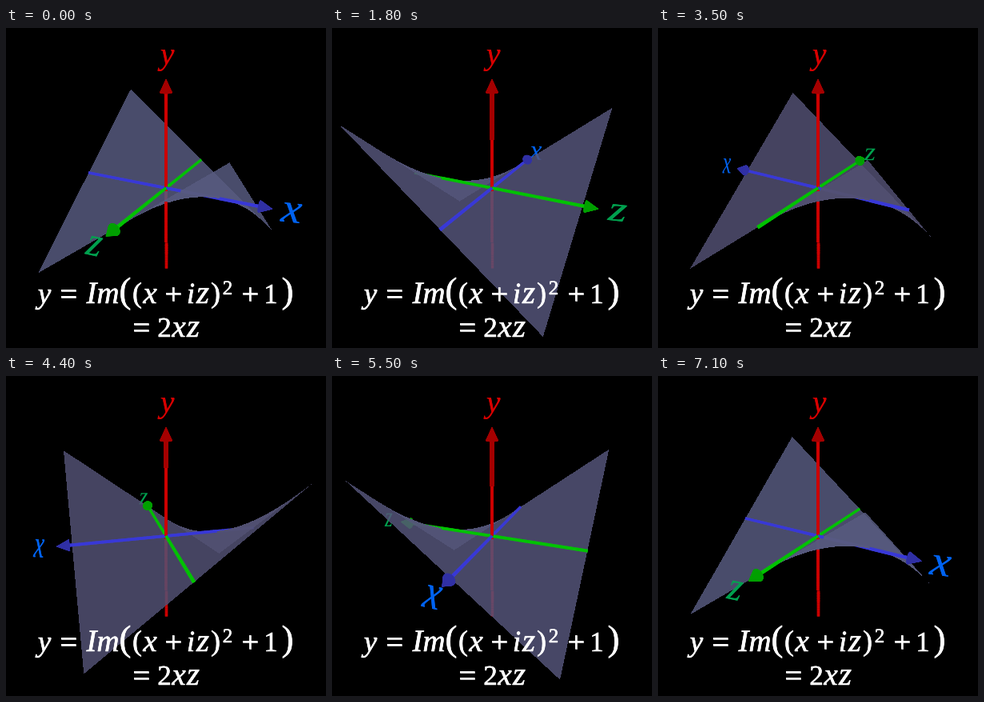
A matplotlib script for the animation above (7.2 s loop, 400 px wide and 400 px high).

```python
import numpy as np
import matplotlib.pyplot as plt
from matplotlib.animation import FuncAnimation
from matplotlib.collections import LineCollection, PolyCollection
from matplotlib.patches import PathPatch
from matplotlib.path import Path
from matplotlib.patheffects import withStroke
from matplotlib.textpath import TextPath

SIZE, FRAMES, STEP_MS = 400, 72, 100
PX = 72 / 100                       # points per pixel

# Camera
DIST, FOCAL = 4.3, 508
SIN_E, COS_E = 0.398, 0.9174
START = 26.4                        # degrees

# Saddle y = K x z over [LOW, HIGH] squared
K, LOW, HIGH, ALPHA = 0.8, -1.0, 0.972, 0.84

HEAD_BASE, HEAD_TIP, HEAD_RADIUS = 1.0, 1.12, 0.058
LABEL_AT = 1.295

# em and wide set the size and breadth of each axis letter
AXES = {
    "x": dict(dir=np.array([1.0, 0, 0]), shaft=(56, 56, 215),
              head=(48, 48, 165), text=(0, 98, 240), em=196, wide=0.97),
    "y": dict(dir=np.array([0, 1.0, 0]), shaft=(205, 0, 0),
              head=(165, 0, 0), text=(215, 0, 0), em=150, wide=1.0),
    "z": dict(dir=np.array([0, 0, 1.0]), shaft=(0, 195, 0),
              head=(0, 160, 0), text=(0, 160, 78), em=168, wide=1.17),
}


def rgb(color):
    return tuple(c / 255 for c in color)


def project(pts, a):
    """Screen x, screen y and depth of points (x, y, z)."""
    x, y, z = np.moveaxis(np.asarray(pts, float), -1, 0)
    r = x * np.cos(a) - z * np.sin(a)
    d = x * np.sin(a) + z * np.cos(a)
    depth = DIST - d * COS_E - y * SIN_E
    return (200 + FOCAL * r / depth,
            200 + FOCAL * (d * SIN_E - y * COS_E) / depth, depth)


def hits(px, py, a):
    """Both depths at which pixel rays meet the saddle (inf for a miss)."""
    p, q = (px - 200) / FOCAL, (200 - py) / FOCAL
    ca, sa = np.cos(a), np.sin(a)
    vd = -COS_E - q * SIN_E
    vy = -SIN_E + q * COS_E
    vx, vz = p * ca + vd * sa, -p * sa + vd * ca
    ox, oy, oz = DIST * COS_E * sa, DIST * SIN_E, DIST * COS_E * ca
    A = K * vx * vz
    B = K * (ox * vz + oz * vx) - vy
    C = K * ox * oz - oy
    found = []
    with np.errstate(all="ignore"):
        root = np.sqrt(B * B - 4 * A * C)
        m = -0.5 * (B + np.where(B < 0, -root, root))
        for s in (m / A, C / m):
            x, z = ox + s * vx, oz + s * vz
            ok = ((s > 0) & (x >= LOW) & (x <= HIGH)
                  & (z >= LOW) & (z <= HIGH))
            found.append(np.where(ok, s, np.inf))
    return found


def hidden(pts, a, bias=0.06):
    px, py, depth = project(pts, a)
    s1, s2 = hits(px, py, a)
    return np.minimum(s1, s2) < depth - bias


def surface(a):
    s1, s2 = hits(PIX_X, PIX_Y, a)
    count = np.isfinite(s1).astype(int) + np.isfinite(s2)
    blend = 0.5 + 0.5 * np.cos(a - 0.4)
    tint = (1 - blend) * np.array([70, 68, 97]) + blend * np.array([74, 77, 109])
    img = np.empty((SIZE, SIZE, 4))
    img[..., :3] = tint / 255 / ALPHA
    img[..., 3] = 1 - (1 - ALPHA) ** count
    return img


def cone(axis, a):
    """Base disc and side triangles of an arrowhead, on screen."""
    u, v = np.roll(axis, 1), np.roll(axis, 2)
    t = np.linspace(0, 2 * np.pi, 19)[:, None]
    ring = axis * HEAD_BASE + HEAD_RADIUS * (np.cos(t) * u + np.sin(t) * v)
    base = np.column_stack(project(ring, a)[:2])
    tip = np.array(project(axis * HEAD_TIP, a)[:2])
    return [base] + [np.array([tip, p, q]) for p, q in zip(base, base[1:])]


def head_visible(axis, a):
    along = np.linspace(HEAD_BASE, HEAD_TIP, 4)[:, None] * axis
    return not hidden(along, a).any()


def shafts(a):
    """Axis pieces sorted far to near: depth, segment, width, colour, visible."""
    edges = np.linspace(-1, HEAD_BASE, 61)
    parts = [(edges, s["dir"], s["shaft"], 16.0) for s in AXES.values()]
    # Darker sleeve below the vertical arrowhead
    low = 1 - 0.24 * (1 + np.cos(2 * (a + np.radians(55))))
    if low < 0.97:
        parts.append((np.linspace(low, 1, 13), AXES["y"]["dir"],
                      AXES["y"]["head"], 23.0))
    rows = []
    for ts, axis, color, width in parts:
        gap = ts[1] - ts[0]
        mid = ((ts[:-1] + ts[1:]) / 2)[:, None] * axis
        x0, y0, _ = project(mid - 0.6 * gap * axis, a)
        x1, y1, _ = project(mid + 0.6 * gap * axis, a)
        depth = project(mid, a)[2]
        covered = hidden(mid, a)
        for i, dep in enumerate(depth):
            rows.append((dep - (0.02 if width > 20 else 0),
                         [(x0[i], y0[i]), (x1[i], y1[i])],
                         width / dep * PX, rgb(color), not covered[i]))
    return sorted(rows, key=lambda row: -row[0])


def glyph(ch):
    path = TextPath((0, 0), ch, size=1,
                    prop={"family": "Liberation Serif", "style": "italic"})
    box = path.get_extents()
    return path.vertices - [(box.x0 + box.x1) / 2, (box.y0 + box.y1) / 2], path.codes


def label_path(name, a):
    spec = AXES[name]
    cx, cy, depth = project(spec["dir"] * LABEL_AT, a)
    verts, codes = GLYPHS[name]
    wide, tilt = spec["wide"], 0.0
    if name != "y":
        b = a + (np.pi / 2 if name == "z" else 0)
        wide *= 0.88 + 0.28 * np.cos(b - 0.15)
        tilt = np.radians(14) * max(0, np.sin(b))
    em = spec["em"] / depth
    x, y = verts[:, 0] * wide * em, -verts[:, 1] * em
    out = np.column_stack([cx + x * np.cos(tilt) - y * np.sin(tilt),
                           cy + x * np.sin(tilt) + y * np.cos(tilt)])
    return Path(out, codes), depth < DIST


PIX_X, PIX_Y = np.meshgrid(np.arange(SIZE) + 0.5, np.arange(SIZE) + 0.5)
GLYPHS = {name: glyph(name) for name in AXES}

fig = plt.figure(figsize=(4, 4), dpi=100, facecolor="black")
ax = fig.add_axes([0, 0, 1, 1])
ax.axis("off")

image = ax.imshow(np.zeros((SIZE, SIZE, 4)), extent=(0, SIZE, SIZE, 0),
                  interpolation="nearest", zorder=2)
ax.set_xlim(0, SIZE)
ax.set_ylim(SIZE, 0)

# Everything is drawn beneath the veil; unobstructed parts again above it.
lines, heads, labels = [], [], []
for z in (1, 3):
    lines.append(ax.add_collection(LineCollection([], zorder=z, capstyle="butt"),
                                   autolim=False))
    heads.append(ax.add_collection(PolyCollection([], zorder=z + 0.1),
                                   autolim=False))
    labels.append({n: ax.add_patch(PathPatch(Path([(0, 0)]), lw=0, zorder=z + 0.2,
                                             fc=rgb(s["text"])))
                   for n, s in AXES.items()})

# Formula: text, centre x, baseline, size in pixels, italic
FORMULA = [
    ("y", 48, 344, 37, 1), ("=", 78, 345, 40, 0), ("Im", 121, 344, 39, 1),
    ("(", 149, 343, 45, 0), ("(", 164, 343, 36, 0), ("x", 180, 344, 39, 1),
    ("+", 209, 345, 38, 0), ("i", 231, 344, 37, 1), ("z", 246, 344, 41, 1),
    (")", 262, 343, 36, 0), ("2", 277, 333, 25, 0), ("+", 305, 345, 38, 0),
    ("1", 331, 344, 35, 0), (")", 352, 343, 45, 0),
    ("=", 169, 387, 40, 0), ("2", 198, 386, 35, 0), ("x", 216, 386, 39, 1),
    ("z", 234, 386, 41, 1),
]
for s, x, y, size, italic in FORMULA:
    ax.text(x, y, s, color="white", ha="center", va="baseline", zorder=5,
            family="Liberation Serif", fontsize=size * PX,
            style="italic" if italic else "normal",
            path_effects=[withStroke(linewidth=0.4, foreground="white")])


def update(frame):
    a = np.radians(START - frame * 360 / FRAMES)
    image.set_data(surface(a))

    rows = shafts(a)
    order = sorted(AXES.values(), key=lambda s: -project(s["dir"], a)[2])
    for layer in (0, 1):
        shown = [r for r in rows if layer == 0 or r[4]]
        lines[layer].set_segments([r[1] for r in shown])
        lines[layer].set_linewidths([r[2] for r in shown])
        lines[layer].set_colors([r[3] for r in shown])

        polys, colors = [], []
        for spec in order:
            if layer == 0 or head_visible(spec["dir"], a):
                shape = cone(spec["dir"], a)
                polys += shape
                colors += [rgb(spec["head"])] * len(shape)
        heads[layer].set_verts(polys)
        heads[layer].set_facecolor(colors)
        heads[layer].set_edgecolor(colors)
        heads[layer].set_linewidth(0.4)

        for name, patch in labels[layer].items():
            path, near = label_path(name, a)
            patch.set_path(path)
            patch.set_visible(layer == 0 or near)
    return []


anim = FuncAnimation(fig, update, frames=FRAMES, interval=STEP_MS,
                     init_func=lambda: update(0), repeat=True, repeat_delay=0)
plt.show()
```
